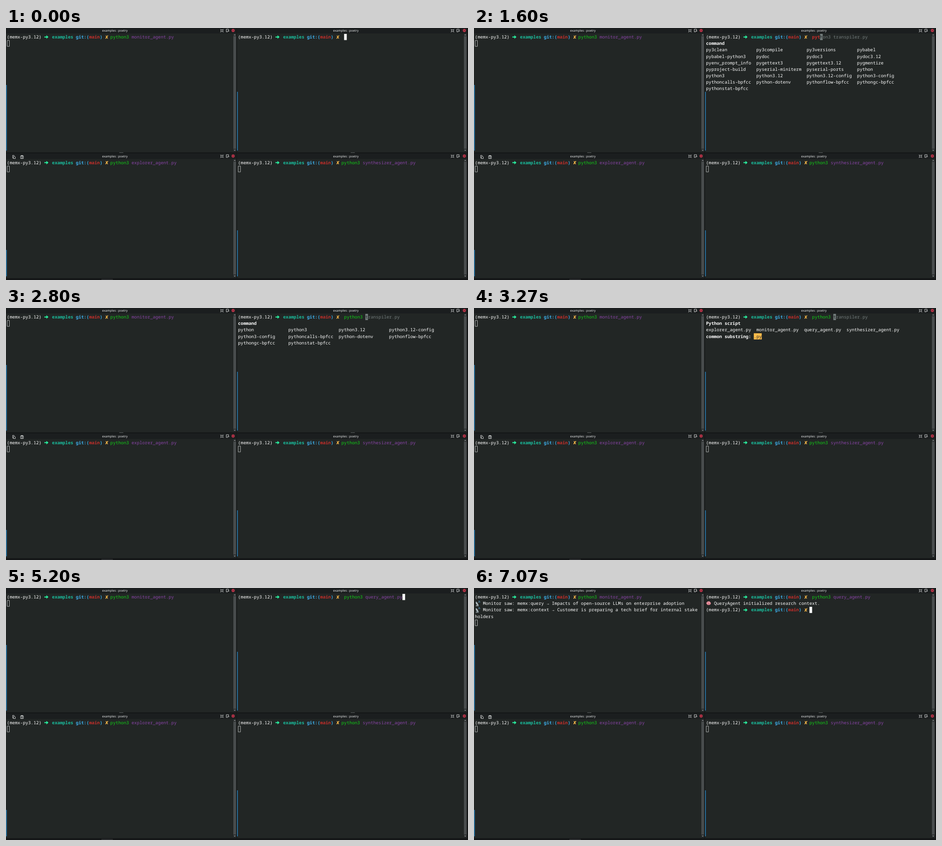
These frames come from a looping animation (1012x553 px, 8000 ms). An HTML page:

```html
<!DOCTYPE html>
<html lang="en">
<head>
<meta charset="utf-8">
<style>
  html, body { margin: 0; width: 100%; height: 100%; overflow: hidden; background: #141617; }
  svg { display: block; }
  text { font: 9.68px "Noto Sans Mono", "DejaVu Sans Mono", monospace; white-space: pre; text-rendering: geometricPrecision; }
  .bold { font-weight: 700; }
  .title { font: 6.7px "Noto Sans", sans-serif; text-anchor: middle; fill: #eceeee; }
</style>
</head>
<body>
<svg width="1012" height="553" viewBox="0 0 1012 553"><g id="chrome"></g><g id="screen"></g></svg>
<script>
const LOOP = 8000, CELL = 5.808, LINE = 14.17;
const BG = '#222625', WHITE = '#fcfcfc', GREY = '#737c7c', GREEN = '#11d116',
  RED = '#c62f2b', BLUE = '#3daee9', TEAL = '#1abc9c', MINT = '#2af0a0',
  YELLOW = '#fdbc4b', PURPLE = '#8a44a8', ICON = '#d8dada';

const rect = (x, y, w, h, fill) => `<rect x="${x}" y="${y}" width="${w}" height="${h}" fill="${fill}"/>`;
const path = (d, stroke, fill = 'none', width = 1) =>
  `<path d="${d}" stroke="${stroke}" fill="${fill}" stroke-width="${width}"/>`;

// ---- window chrome ----
function pane(x, y, bottom, barTop) {
  const bar = x ? 1003 : 498, mid = bar + 3, icon = y + 5.5, close = x ? 1004 : 497.5;
  return rect(x, y, bar + 6.5 - x, bottom + 2 - y, BG)
    + rect(x, y, bar + 6.5 - x, 12, '#1b1e1f')
    + rect(bar, y + 12, 6, bottom - y - 12, '#2a2e2f')
    + rect(bar, y + 18, 6, bottom - y - 24, '#484c4d')
    + path(`M${mid - 1.5} ${y + 16}l1.5 -1.5l1.5 1.5M${mid - 1.5} ${bottom - 3.5}l1.5 1.5l1.5 -1.5`, ICON, 'none', .9)
    + rect(x, barTop, 2, bottom - 2 - barTop, '#29709c')
    + `<text class="title" x="${x + 238.5}" y="${y + 8.3}">examples : poetry</text>`
    + path(`M${bar - 28.5} ${icon - 3}l2 2m3 0l2 -2m0 7l-2 -2m-3 0l-2 2`, ICON, 'none', .9)
    + path(`M${bar - 27.2} ${icon - 1.6}h4.4v3.8h-4.4z`, ICON, 'none', .8)
    + path(`M${bar - 12} ${icon + 3}h-3.5v-6h5v2.5m-3 1.5h4m-1.5 -1.5l1.5 1.5l-1.5 1.5`, ICON, 'none', .9)
    + `<circle cx="${close}" cy="${icon}" r="3.4" fill="#bb3449"/>`
    + path(`M${close - 1.3} ${icon - 1.3}l2.6 2.6m0 -2.6l-2.6 2.6`, '#3a1a20', 'none', .7);
}

document.getElementById('chrome').innerHTML =
  pane(0, 0, 271, 125) + pane(506, 0, 271, 140)
  + pane(0, 275.5, 547, 487) + pane(506, 275.5, 547, 444)
  + rect(248, 273, 9, 1, '#5a5e5f') + rect(755, 273, 9, 1, '#5a5e5f')
  + rect(209, 551, 25, 1, '#45494a')
  + path('M16.5 285.5h-2v-6h3l1 1M16.5 281.5h2.5l1.5 1.5v3.5h-4z', ICON, 'none', .9)
  + path('M32 280.5h6v6h-6z', ICON)
  + path('M33.5 279.8h3v1.5h-3zM34 283.5h3M34 285h2', ICON, ICON, .8);

// ---- terminal cells ----
const terminal = (x, y) => {
  const px = col => x + col * CELL, top = row => y + 12.9 + row * LINE;
  return {
    put: (col, row, s, fill = WHITE, bold = false) =>
      `<text class="${bold ? 'bold' : ''}" x="${px(col)}" y="${top(row) + 10.1}" fill="${fill}">${s}</text>`,
    block: (col, row, fill = WHITE, n = 1) => rect(px(col), top(row), n * CELL, 13.6, fill),
    hollow: row => path(`M${px(0) + .4} ${top(row) + .4}h5v12.8h-5z`, '#d6d8d8', 'none', .8),
    at: (col, row, art) => `<g transform="translate(${px(col)} ${top(row)})">${art}</g>`
  };
};

const arrow = path('M.6 6.9h6.4', MINT, 'none', 2.1) + path('M5.2 3.4l4.2 3.5l-4.2 3.5z', MINT, MINT, .4);
const cross = path('M1.2 10.4Q3 7 6.4 3.6M2 3.8Q3.4 7.4 5.8 10.2', YELLOW, 'none', 1.6);

const prompt = (t, row) => t.put(0, row, '(memx-py3.12)')
  + t.at(14, row, arrow)
  + t.put(17, row, 'examples', TEAL, true)
  + t.put(26, row, 'git:(', BLUE, true)
  + t.put(31, row, 'main', RED, true)
  + t.put(35, row, ')', BLUE, true)
  + t.at(37, row, cross);

const command = (t, file, col = 39) => prompt(t, 0)
  + t.put(col, 0, 'python3', GREEN) + t.put(col + 8, 0, file, PURPLE);

const dish = path('M2 4Q2 10 8 10.5L3 3z', '#8fa0a8', '#c3cdd2', .8)
  + path('M4 10l-2 2.5h6l-2 -2.5M5 7l3 -3', '#8b979c', '#8b979c', .9)
  + path('M7.5 2.5q2 .5 2 2.5M8 .8q3.2 .6 3.2 4', '#58a9d8', 'none', .8);
const brain = path('M1.5 8Q0 5.5 2.2 4Q3.5 1.8 5.6 2.6Q8 1.8 9 4Q11 5.5 9.8 8Q9 10.5 6.5 9.8Q3 11 1.5 8z', '#c9707f', '#ee9aa6', .7)
  + path('M3 5q2 -1 2.5 1t2.5 0M3 8q1.5 -1 2.5 0t2.5 -.5', '#b95a6c', 'none', .8);

// ---- completion menus ----
const grid = words => {
  const w = words.split(' '), rows = [];
  while (w.length) rows.push(w.splice(0, 4).map(s => s.padEnd(19)).join(''));
  return rows;
};
const menus = {
  py: ['command', ...grid('py3clean py3compile py3versions pybabel pybabel-python3 pydoc pydoc3 pydoc3.12 '
    + 'pyenv_prompt_info pygettext3 pygettext3.12 pygmentize pyproject-build pyserial-miniterm pyserial-ports python '
    + 'python3 python3.12 python3.12-config python3-config pythoncalls-bpfcc python-dotenv pythonflow-bpfcc pythongc-bpfcc '
    + 'pythonstat-bpfcc')],
  python: ['command', ...grid('python python3 python3.12 python3.12-config python3-config pythoncalls-bpfcc '
    + 'python-dotenv pythonflow-bpfcc pythongc-bpfcc pythonstat-bpfcc')],
  scripts: ['Python script', 'explorer_agent.py  monitor_agent.py  query_agent.py  synthesizer_agent.py'],
  query: ['Python script', 'query_agent.py']
};

// time, typed text, menu
const typing = [
  [0, ''], [1130, 'p'], [1270, 'py'], [1470, 'py', 'py'], [1600, 'pyt', 'py'],
  [1670, 'pyth', 'py'], [1730, 'pytho', 'py'], [1800, 'python', 'py'], [1870, 'python', 'python'],
  [2670, 'python3', 'python'], [2800, 'python3 ', 'python'], [2930, 'python3 ', 'scripts'],
  [3800, 'python3 q', 'scripts'], [3930, 'python3 q', 'query'],
  [5070, 'python3 query_agent.py', 'query'], [5200, 'python3 query_agent.py']
];
const ENTER = 6470, OUTPUT = 6800, DONE = 6930;
const HINT = 'python3 transpiler.py';

const monitor = terminal(2.1, 0), query = terminal(508.3, 0),
  explorer = terminal(2.1, 275.6), synth = terminal(508.3, 275.6);

function editLine(t, typed, menu) {
  const [cmd, arg = ''] = typed.split(' '), known = /^python3?$/.test(cmd);
  const rest = typed && HINT.startsWith(typed) ? HINT.slice(typed.length) : '';
  const col = 40 + typed.length;
  let out = prompt(t, 0) + t.put(40, 0, cmd, known ? GREEN : RED, !known)
    + t.put(48, 0, arg, arg.length > 1 ? PURPLE : WHITE)
    + t.block(col, 0, rest ? GREY : WHITE);
  if (rest) out += t.put(col, 0, rest[0], BG) + t.put(col + 1, 0, rest.slice(1), GREY);
  (menus[menu] || []).forEach((s, i) => out += t.put(0, i + 1, s, WHITE, !i));
  if (menu === 'scripts')
    out += t.put(0, 3, 'common substring:', WHITE, true) + t.block(18, 3, YELLOW, 3) + t.put(18, 3, '.py', BG);
  return out;
}

function queryPane(time) {
  if (time < ENTER) {
    const [, typed, menu] = typing.filter(s => s[0] <= time).pop();
    return editLine(query, typed, menu);
  }
  let out = command(query, 'query_agent.py', 40);
  if (time >= OUTPUT) out += query.at(0, 1, brain) + query.put(3, 1, 'QueryAgent initialized research context.');
  if (time >= DONE) return out + prompt(query, 2) + query.block(39, 2);
  return out + query.block(0, time < OUTPUT ? 1 : 2);
}

function monitorPane(time) {
  const out = command(monitor, 'monitor_agent.py');
  if (time < OUTPUT) return out + monitor.hollow(1);
  const saw = (row, key, value) => monitor.at(0, row, dish)
    + monitor.put(3, row, 'Monitor saw: memx:' + key)
    + monitor.put(22 + key.length, row, '→')
    + monitor.put(24 + key.length, row, value);
  return out + saw(1, 'query', 'Impacts of open-source LLMs on enterprise adoption')
    + saw(2, 'context', 'Customer is preparing a tech brief for internal stake')
    + monitor.put(0, 3, 'holders') + monitor.hollow(4);
}

const screen = document.getElementById('screen');
const idle = command(explorer, 'explorer_agent.py') + explorer.hollow(1)
  + command(synth, 'synthesizer_agent.py') + synth.hollow(1);
let shown = '';

function draw(now) {
  const time = now % LOOP, next = monitorPane(time) + queryPane(time) + idle;
  if (next !== shown) screen.innerHTML = shown = next;
  requestAnimationFrame(draw);
}
draw(0);
</script>
</body>
</html>
```
